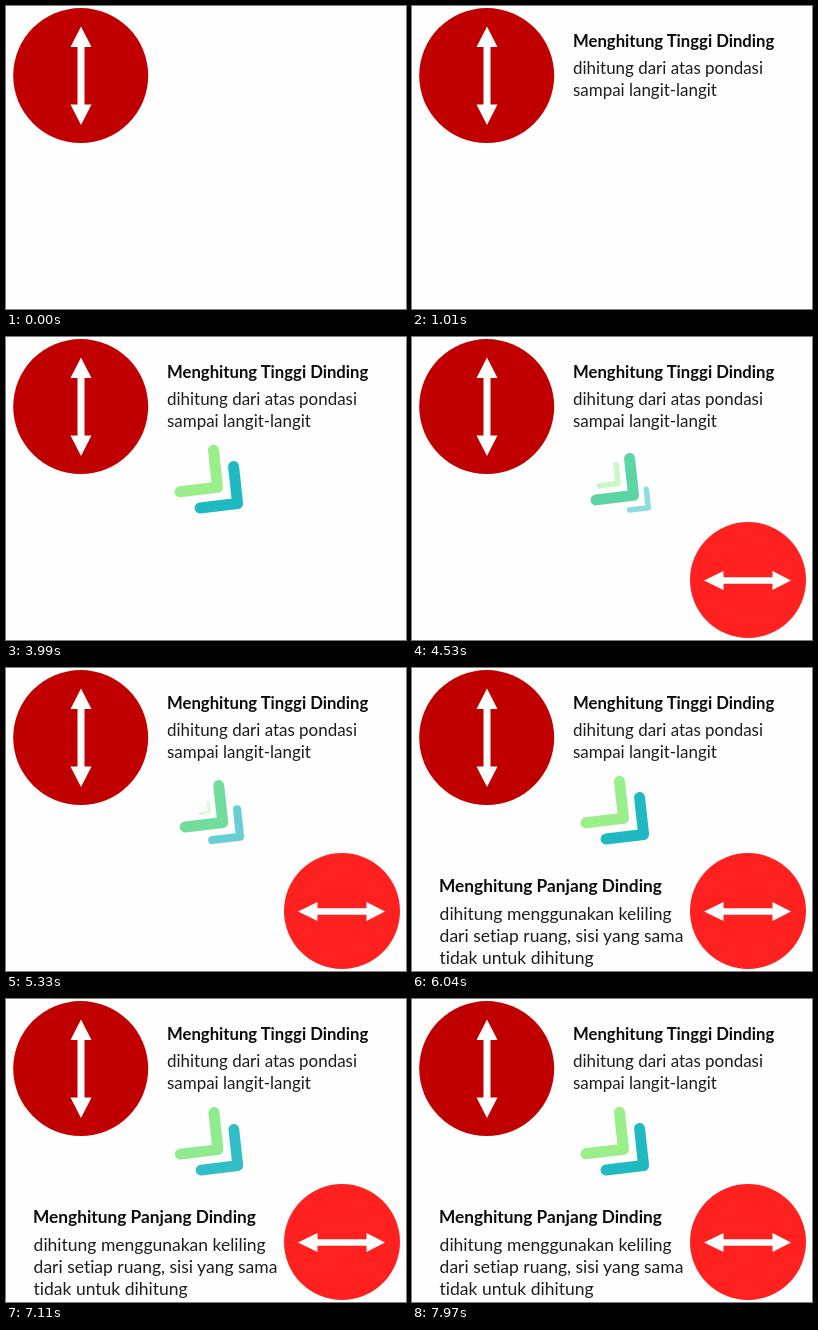
Write an HTML page that moves like this. It is 400 px wide and 303 px high and loops after 8050 ms.

```html
<!DOCTYPE html>
<html lang="id">
<head>
<meta charset="utf-8">
<title>Menghitung Dinding</title>
<style>
html, body { margin: 0; height: 100%; overflow: hidden; background: #fefefe; }
svg { display: block; width: 100%; height: 100%; }
text { font-family: Lato, Carlito, sans-serif; font-variant-ligatures: none; fill: #1c1c1c; }
.title { font-weight: 700; fill: #0c0c0c; }
.top text { font-size: 16.95px; }
.top .title { font-size: 16.7px; }
.bottom text { font-size: 17.5px; }
.bottom .title { font-size: 17.3px; }
.chevron { fill: none; stroke-width: 11; stroke-linecap: round; stroke-linejoin: round; }
</style>
</head>
<body>
<svg viewBox="0 0 400 303">
  <circle cx="74.7" cy="69.6" r="67.5" fill="#c00000"/>
  <path fill="#fff" d="M75 20.5L85.5 41H78.5V98.5H85.5L75 119L64.5 98.5H71.5V41H64.5Z"/>
  <g class="top" data-from="1010">
    <text class="title" x="161" y="40.5">Menghitung Tinggi Dinding</text>
    <text x="161" y="67.5">dihitung dari atas pondasi</text>
    <text x="161" y="89.5">sampai langit-langit</text>
  </g>
  <g data-from="4030">
    <circle cx="336" cy="243" r="58" fill="#ff2020"/>
    <path fill="#fff" d="M292 243.5L311.5 234V240.3H360.5V234L379 243.5L360.5 253V246.7H311.5V253Z"/>
  </g>
  <g class="bottom" data-from="6040">
    <text class="title" x="27" y="223.8">Menghitung Panjang Dinding</text>
    <text x="27.6" y="251.5">dihitung menggunakan keliling</text>
    <text x="27.6" y="273.5">dari setiap ruang, sisi yang sama</text>
    <text x="27.6" y="295.5">tidak untuk dihitung</text>
  </g>
  <g data-from="3020">
    <path class="chevron" d="M-4 -37L0 0L-37.5 4.5"/>
    <path class="chevron" d="M-4 -37L0 0L-37.5 4.5"/>
    <path class="chevron" d="M-4 -37L0 0L-37.5 4.5"/>
  </g>
</svg>
<script>
const LOOP = 8050, STEP = 80.4, STEPS = 12;
const RESTARTS = [3020, 4030, 6040];
const GREEN = [154, 239, 138], TEAL = [31, 185, 193];

// Each chevron travels from one stop to the next: corner, size and opacity, colour.
const STOPS = [
  { x: 200.5, y: 142.5, size: 0, color: GREEN },
  { x: 211.5, y: 150.3, size: 1, color: GREEN },
  { x: 231.6, y: 166.5, size: 1, color: TEAL },
  { x: 241, y: 175, size: 0, color: TEAL }
];

const parts = document.querySelectorAll('[data-from]');
const chevrons = document.querySelectorAll('.chevron');
const mix = (a, b, p) => a + (b - a) * p;
const smooth = p => p * p * (3 - 2 * p);

// Movement eases in and out; colour and opacity change evenly.
function drawChevron(el, i, p) {
  const a = STOPS[i], b = STOPS[i + 1], e = smooth(p);
  const color = a.color.map((c, k) => Math.round(mix(c, b.color[k], p)));
  el.setAttribute('transform',
    `translate(${mix(a.x, b.x, e)} ${mix(a.y, b.y, e)}) scale(${mix(a.size, b.size, e)})`);
  el.setAttribute('stroke', `rgb(${color})`);
  el.setAttribute('opacity', mix(a.size, b.size, p));
}

function draw(now) {
  const t = now % LOOP;
  for (const part of parts)
    part.setAttribute('visibility', t >= part.dataset.from ? 'visible' : 'hidden');
  const start = RESTARTS.filter(r => r <= t).pop() ?? t;
  const p = Math.floor((t - start) / STEP) % STEPS / STEPS;
  chevrons.forEach((el, i) => drawChevron(el, i, p));
}

const begin = performance.now();
function tick() {
  draw(performance.now() - begin);
  requestAnimationFrame(tick);
}
tick();
</script>
</body>
</html>
```
